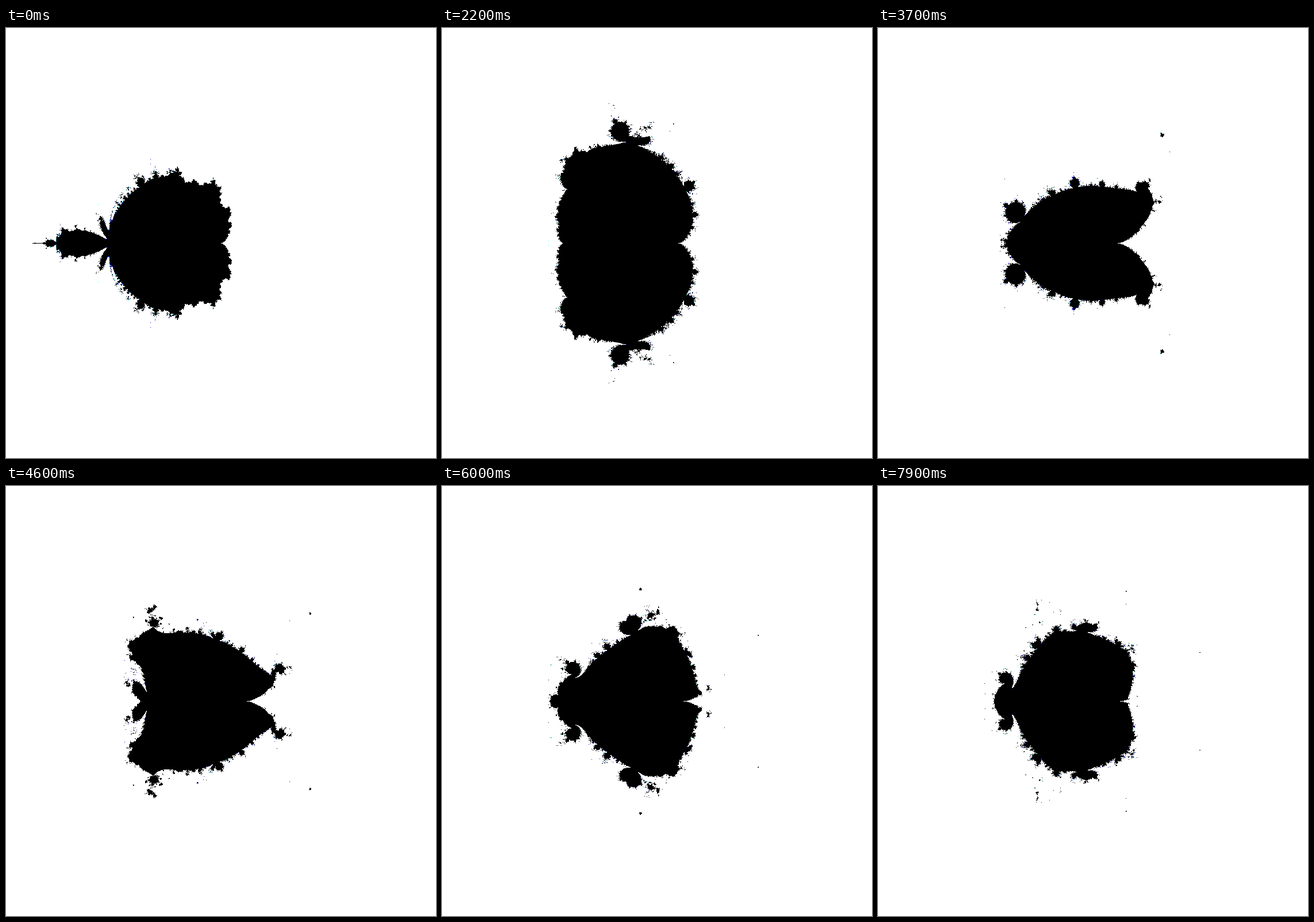
An HTML page with a canvas that plays this animation: 748 by 748 pixels, repeating every 8000 ms.

```html
<!DOCTYPE html>
<html lang="en">
<head>
<meta charset="utf-8">
<title>Fractal morph</title>
<style>
  html, body { margin: 0; width: 100%; height: 100%; overflow: hidden; background: #fff; }
  canvas { display: block; }
</style>
</head>
<body>
<canvas id="stage" width="748" height="748"></canvas>
<script>
const SIZE = 748, SCALE = SIZE / 8;
const MID_X = 373.5, MID_Y = 374;
const STEP = 100, STEPS = 80;
const MAX = 40, BAILOUT = 16;
const BOX = { x: 40, y: 110, w: 530, h: 529 };   // everything outside stays white

// Only the slowest escapes are tinted
const WHITE = 0xffffffff, CYAN = 0xffffff00, BLUE = 0xffff0000, BLACK = 0xff000000;
const palette = Uint32Array.from({ length: MAX + 1 }, (_, n) =>
  n < MAX - 3 ? WHITE : n < MAX - 2 ? CYAN : n < MAX ? BLUE : BLACK);

const ctx = document.getElementById('stage').getContext('2d');
const cache = [];

// Steps until z -> z^2/2 + z^p/2^(p-1) + c escapes
function escapeTime(cx, cy, p) {
  const k = 2 ** (1 - p);
  let x = cx, y = cy, oldX = 9, oldY = 9;
  for (let n = 1; n < MAX; n++) {
    const r2 = x * x + y * y;
    if (r2 > BAILOUT) return n;
    const r = k * Math.exp(p / 2 * Math.log(r2));
    const a = p * Math.atan2(y, x);
    const nx = (x * x - y * y) / 2 + r * Math.cos(a) + cx;
    y = x * y + r * Math.sin(a) + cy;
    x = nx;
    // settled on a cycle, so it never escapes
    if (Math.abs(x - oldX) + Math.abs(y - oldY) < 1e-6) return MAX;
    if (n % 6 === 0) { oldX = x; oldY = y; }
  }
  return MAX;
}

function render(step) {
  if (cache[step]) return cache[step];
  const p = 1 + step / 10;
  const image = new ImageData(BOX.w, BOX.h);
  const pixels = new Uint32Array(image.data.buffer);
  for (let row = 0; row <= MID_Y - BOX.y; row++) {
    const cy = (MID_Y - BOX.y - row) / SCALE;
    const mirror = BOX.h - 1 - row;
    for (let col = 0; col < BOX.w; col++) {
      const color = palette[escapeTime((BOX.x + col - MID_X) / SCALE, cy, p)];
      pixels[row * BOX.w + col] = color;
      pixels[mirror * BOX.w + col] = color;
    }
  }
  return cache[step] = image;
}

let shown = -1;
function draw(ms) {
  const step = Math.floor(ms / STEP) % STEPS;
  if (step === shown) return;
  shown = step;
  ctx.putImageData(render(step), BOX.x, BOX.y);
}

ctx.fillStyle = '#fff';
ctx.fillRect(0, 0, SIZE, SIZE);
const start = performance.now();
draw(0);

function tick() {
  draw(performance.now() - start);
  requestAnimationFrame(tick);
}
requestAnimationFrame(tick);
</script>
</body>
</html>
```
